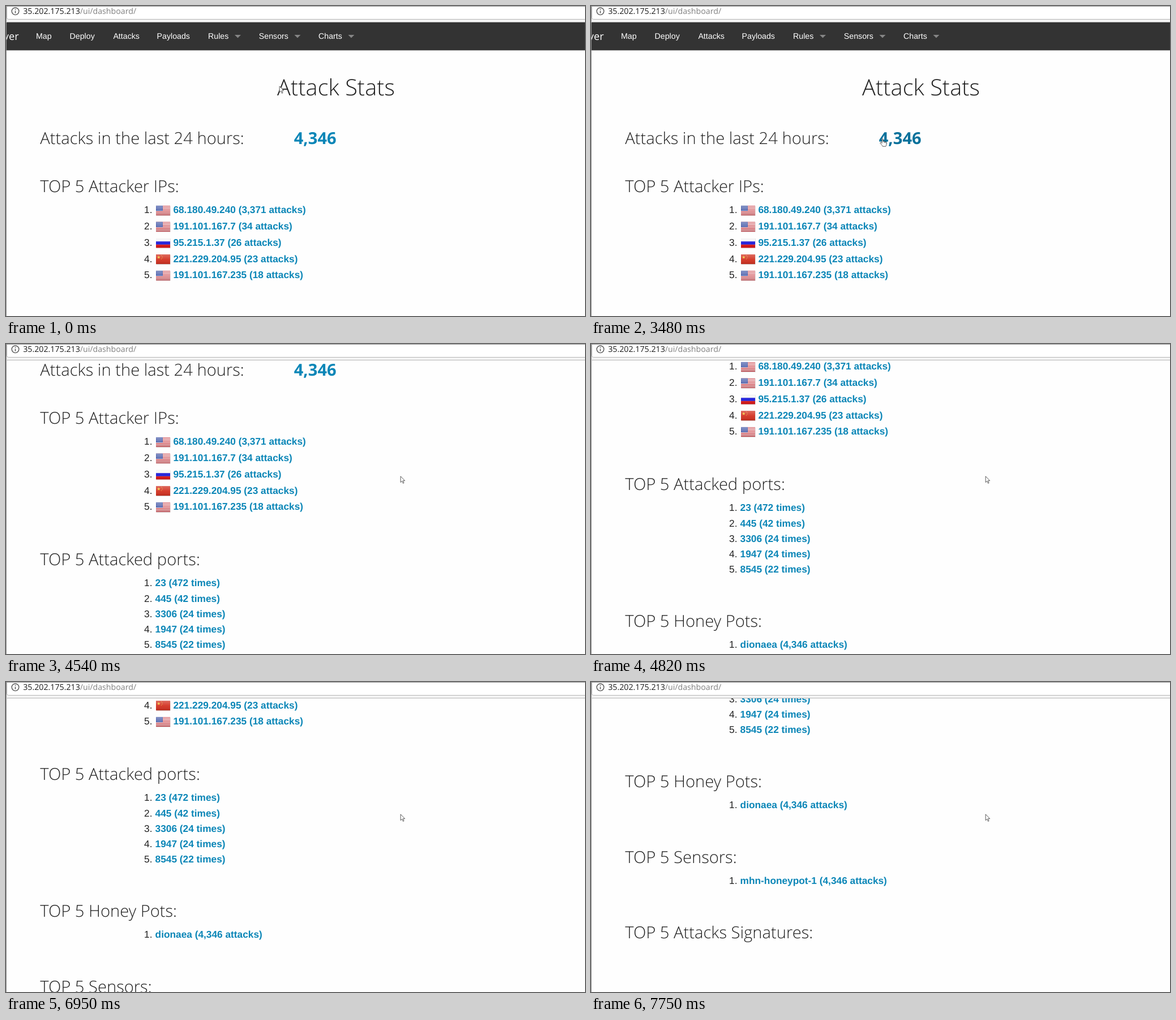
An HTML page that plays this animation: 1023 px wide and 548 px high, repeating every 8000 ms.

```html
<!DOCTYPE html>
<html lang="en">
<head>
<meta charset="utf-8">
<title>Attack Stats</title>
<style>
  html, body { margin: 0; width: 100%; height: 100%; overflow: hidden; background: #fefefe; }
  svg { display: block; width: 1023px; height: 548px; }
  text { text-rendering: geometricPrecision; white-space: pre; }
  .head { font: 300 29.15px "Open Sans", sans-serif; fill: #222; }
  .title { font-size: 39.8px; }
  .total { font: 700 29.15px "Open Sans", sans-serif; }
  .item { font: 17.3px "Liberation Sans", Arial, sans-serif; fill: #222; }
  .link { font-weight: 700; }
  .link, .total { fill: #0b86b7; }
  .total.hover { fill: #08719b; }
  .nav { font: 14.2px "Liberation Sans", Arial, sans-serif; fill: #fff; }
  .brand { font: 18.2px "Open Sans", sans-serif; fill: #fff; }
  .url { font: 14.2px "Open Sans", sans-serif; fill: #1c1c1c; }
</style>
</head>
<body>
<svg id="stage" viewBox="0 0 1023 548">
  <defs>
    <clipPath id="view"><rect x="1" y="29" width="1022" height="519"/></clipPath>
    <linearGradient id="gloss" x2="0" y2="1">
      <stop offset="0" stop-color="#fff" stop-opacity=".28"/>
      <stop offset=".55" stop-color="#fff" stop-opacity=".06"/>
      <stop offset="1" stop-color="#000" stop-opacity=".12"/>
    </linearGradient>
    <g id="us">
      <rect width="25" height="17" fill="#f3e6e6"/>
      <path d="M0 .65H25M0 3.27H25M0 5.9H25M0 8.5H25M0 11.1H25M0 13.7H25M0 16.35H25" stroke="#cf4048" stroke-width="1.3"/>
      <rect width="12" height="9.2" fill="#3f55a5"/>
      <path d="M1.5 1.8H11M2.5 3.7H11M1.5 5.6H11M2.5 7.5H11" stroke="#c9d0ea" stroke-width=".8" stroke-dasharray=".8 1.2"/>
    </g>
    <g id="ru">
      <rect width="25" height="17" fill="#f4f4f4"/>
      <rect y="5.7" width="25" height="5.7" fill="#1414d8"/>
      <rect y="11.4" width="25" height="5.6" fill="#dc1414"/>
    </g>
    <g id="cn">
      <rect width="25" height="17" fill="#d2301f"/>
      <path d="M4.8 2.2l.8 2h2.1l-1.7 1.3.6 2-1.8-1.2-1.8 1.2.6-2L1.9 4.2H4z" fill="#f4c63a"/>
      <path d="M9 1.8h1M10.6 3.6h1M10.6 6h1M9 8h1" stroke="#f0b83a"/>
    </g>
  </defs>
  <rect width="1023" height="548" fill="#fefefe"/>
  <g clip-path="url(#view)"><g id="page"></g></g>
  <g id="chrome">
    <rect width="1023" height="29" fill="#f4f4f4"/>
    <path d="M0 .5H1023" stroke="#8f8f8f"/>
    <path d="M1023 .5H1.5V20.5Q1.5 23.5 4.5 23.5H1023" fill="#fff" stroke="#b4b4b4"/>
    <path d="M0 .5H1023M.5 0V548" stroke="#8f8f8f"/>
    <path d="M0 28.5H1023" stroke="#b8b8b8"/>
    <circle cx="16.5" cy="9.3" r="6.3" fill="none" stroke="#555" stroke-width="1.4"/>
    <path d="M16.5 8.4V12.8M16.5 5.6V7.1" stroke="#555" stroke-width="1.5"/>
    <text class="url" x="30.2" y="14">35.202.175.213<tspan fill="#808080">/ui/dashboard/</tspan></text>
  </g>
  <g stroke="#333" stroke-width=".8" fill="#fff" stroke-linejoin="round">
    <path id="arrow" d="M.2 .8V11.6L2.7 9.3 4.5 13.3 6.1 12.6 4.4 8.7H7.8Z"/>
    <path id="hand" d="M-.8 7.6V.8Q-.8 -.4 .1 -.4T1 .8V4.4Q2.8 3.7 3 4.8 4.6 4.2 4.9 5.4 6.9 4.9 7 6.6V9.2Q7 11.2 5.8 13.2H.4Q-.4 11.4 -2.2 9.6L-4 7.4Q-4.3 6.2 -3 6.2Q-1.8 6.5 -.8 7.6ZM3 4.8V7M4.9 5.4V7.2"/>
  </g>
</svg>
<script>
const NS = "http://www.w3.org/2000/svg";
const LOOP = 8000;
const byId = id => document.getElementById(id);
const page = byId("page");

function add(tag, attrs, content = "") {
  const el = document.createElementNS(NS, tag);
  for (const key in attrs) el.setAttribute(key, attrs[key]);
  el.textContent = content;
  page.appendChild(el);
  return el;
}
const label = (cls, x, y, content) => add("text", { class: cls, x, y }, content);

// Heading with a numbered list below it
function section(base, title, rows, { pitch = 27.25, flags = [] } = {}) {
  label("head", 60.3, base, title);
  rows.forEach((row, i) => {
    const y = base + 37.3 + i * pitch;
    label("item", 244.1, y, `${i + 1}.`);
    if (flags[i]) {
      const transform = `translate(265 ${y - 13.4})`;
      add("rect", { x: .5, y: .8, width: 25, height: 17, fill: "#000", opacity: .2, transform });
      add("use", { href: "#" + flags[i], transform });
      add("rect", { width: 25, height: 17, fill: "url(#gloss)", transform });
    }
    label("item link", flags[i] ? 295.4 : 263.6, y, row);
  });
}

// Navigation bar
add("rect", { x: 0, y: 29, width: 1023, height: 49.4, fill: "#333" });
label("brand", -4.2, 60, "ver");
for (const [name, x, menu] of [
  ["Map", 53], ["Deploy", 112.6], ["Attacks", 189.4], ["Payloads", 266.6],
  ["Rules", 357, 409.5], ["Sensors", 446.8, 515], ["Charts", 552, 610]
]) {
  label("nav", x, 58, name);
  if (menu) add("path", { d: `M${menu - 5.5} 51h11l-5.5 5.5z`, fill: "#858585" });
}

// Statistics
label("head title", 479, 157.5, "Attack Stats");
label("head", 60.3, 244, "Attacks in the last 24 hours:");
const total = label("total", 508.7, 244, "4,346");
section(329, "TOP 5 Attacker IPs:", [
  "68.180.49.240 (3,371 attacks)",
  "191.101.167.7 (34 attacks)",
  "95.215.1.37 (26 attacks)",
  "221.229.204.95 (23 attacks)",
  "191.101.167.235 (18 attacks)"
], { pitch: 28.75, flags: ["us", "us", "ru", "cn", "us"] });
section(579, "TOP 5 Attacked ports:",
  ["23 (472 times)", "445 (42 times)", "3306 (24 times)", "1947 (24 times)", "8545 (22 times)"]);
section(821, "TOP 5 Honey Pots:", ["dionaea (4,346 attacks)"]);
section(955, "TOP 5 Sensors:", ["mhn-honeypot-1 (4,346 attacks)"]);
section(1088, "TOP 5 Attacks Signatures:", []);

const linear = u => u;
const easeIn = u => u ** 4;
const easeOut = u => 1 - (1 - u) ** 2.54;
const settle = u => Math.sin(u * Math.PI / 2) ** 1.5;

// A leg moves in a number of held steps, then rests until the next leg.
const leg = (start, end, steps, from, to, ease = linear) => ({ start, end, steps, from, to, ease });

const scroll = [
  leg(0, 4050, 1, [0], [0]),
  leg(4050, 4330, 2, [0], [77], easeIn),
  leg(4540, 5370, 6, [188], [395], easeOut),
  leg(6950, 7750, 6, [406], [635], settle)
];
const pointer = [
  leg(0, 430, 1, [483, 141], [483, 141]),
  leg(430, 660, 1, [505, 159], [664, 159]),
  leg(1230, 1660, 1, [731, 168], [978, 222]),
  leg(1790, 2220, 3, [776, 194], [582, 225]),
  leg(2510, 2820, 2, [585, 229], [589, 233]),
  leg(2960, 3480, 4, [565, 233], [515, 235], easeOut),
  leg(3630, 3780, 1, [698, 241], [697, 233])
];

function locate(legs, t) {
  const { start, end, steps, from, to, ease } = legs.findLast(l => l.start <= t);
  const u = Math.min(1, Math.floor((t - start) / (end - start) * steps + 1e-6) / steps);
  return from.map((a, i) => Math.round(a + (to[i] - a) * ease(u)));
}

function draw(t) {
  const [offset] = locate(scroll, t);
  const [x, y] = locate(pointer, t);
  const over = x > 509 && x < 584 && y > 222 && y < 248;
  page.setAttribute("transform", `translate(0 ${-offset})`);
  for (const [id, shown] of [["arrow", !over], ["hand", over]]) {
    byId(id).setAttribute("transform", `translate(${x} ${y})`);
    byId(id).setAttribute("visibility", shown ? "visible" : "hidden");
  }
  total.classList.toggle("hover", over);
}

const begin = performance.now();
function tick() {
  draw((performance.now() - begin) % LOOP);
  requestAnimationFrame(tick);
}
tick();
</script>
</body>
</html>
```
